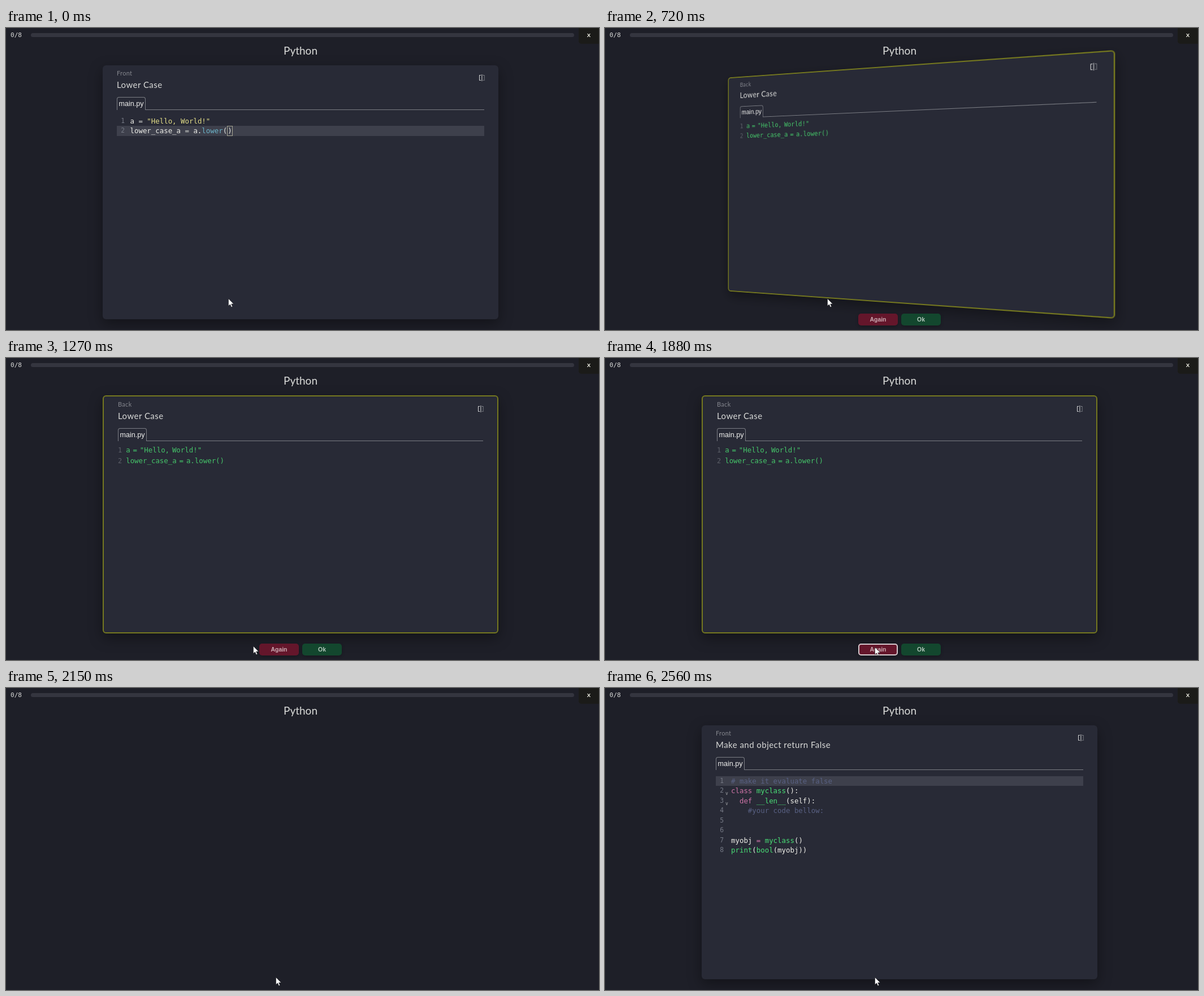
Recreate the animation shown at these times as an HTML page. Size 1049 by 534 pixels, loop 2.89 s.

```html
<!DOCTYPE html>
<html lang="en">
<head>
<meta charset="utf-8">
<title>Flashcards</title>
<style>
  html, body { margin: 0; width: 100%; height: 100%; overflow: hidden; background: #1e1f28; }
  body { position: relative; color: #d9dad8; font-family: Lato, sans-serif; }
  div, svg { position: absolute; box-sizing: border-box; }
  .count { left: 8px; top: 5px; font: 11.1px/16px "DejaVu Sans Mono", monospace; }
  .bar { left: 44px; top: 9px; width: 961px; height: 7px; border-radius: 4px; background: #34353f; }
  .close { left: 1013px; top: 0; width: 36px; height: 28px; border-radius: 0 0 0 5px; background: #1b1b19;
    font: bold 9.6px/26px "Liberation Sans", sans-serif; text-align: center; color: #f0f0e6; }
  .deck { left: 0; top: 28px; width: 1042px; font-size: 19px; line-height: 24px; text-align: center; }
  .clip { left: 0; top: 33px; width: 1049px; height: 501px; overflow: hidden; }
  .slide { left: 171px; top: 33px; width: 700px; height: 449px; }
  .face { left: 0; top: 0; width: 700px; height: 449px; border-radius: 6px; background: #282a36;
    box-shadow: 0 8px 24px rgba(0, 0, 0, .38); }
  .back { height: 421px; border: 2px solid #75781f; }
  .inner { inset: 0; }
  .side { left: 25px; top: 6px; font-size: 11px; line-height: 16px; letter-spacing: .3px; color: #85878e; }
  .name { left: 25px; top: 24px; font-size: 15px; line-height: 20px; letter-spacing: .46px; white-space: nowrap; }
  .rule { left: 75px; right: 25px; top: 78px; height: 1px; background: #7b7d84; }
  .tab { left: 25px; top: 56px; width: 51px; height: 23px; border: 1px solid #7b7d84; border-bottom: 0;
    border-radius: 4px 4px 0 0; font: 12.6px/22px "Liberation Sans", sans-serif; text-align: center; color: #f0f0ee; }
  .split { right: 24px; top: 16px; }
  .code { left: 25px; right: 25px; top: 89.5px; --row: 17.5px; --pad: 23.5px;
    font: 12.4px/17.5px "DejaVu Sans Mono", monospace; white-space: pre; color: #f0f0ea; }
  .wide { --pad: 27px; }
  .row { left: 0; width: 100%; top: calc(var(--i) * var(--row)); height: var(--row); padding-left: var(--pad); }
  .on { background: #3e404c; }
  .no { left: 0; top: 0; width: 14px; text-align: right; font-size: 11.4px; color: #747884; }
  .fold { left: 17px; top: 5px; font-size: 8px; color: #a5a7aa; }
  .back .code { top: 86px; --row: 18.5px; --pad: 14.2px; line-height: 18.5px; word-spacing: -2.6px; color: #45c469; }
  .back .no { text-align: left; font-size: 12px; color: #5c5f68; }
  .s { color: #e4df88; } .f { color: #6cb4ca; } .k { color: #d074a8; }
  .g { color: #49df76; } .c { color: #596184; } .o { color: #c9cac8; }
  .m { outline: 1px solid #a6a593; outline-offset: -1px; padding: 1px 1px 2px; }
  .btn { top: 505px; width: 70px; height: 21px; border-radius: 5px; box-shadow: 0 2px 5px rgba(0, 0, 0, .25);
    font: bold 10.4px/21px "Liberation Sans", sans-serif; text-align: center; }
  .again { left: 448px; background: #64162b; color: #cbabb3; }
  .ok { left: 524px; background: #13472e; color: #b3c6bb; }
  .again.hot::after { content: ""; position: absolute; inset: 0; border: 2px solid #d3c8cc; border-radius: 5px; }
  .mouse { left: 0; top: 0; overflow: visible; }
</style>
</head>
<body>
<div class="count">0/8</div>
<div class="bar"></div>
<div class="close">X</div>
<div class="deck">Python</div>
<div class="clip"><div class="slide"></div></div>
<div class="btn again">Again</div>
<div class="btn ok">Ok</div>
<svg class="mouse" width="12" height="18">
  <path d="M.5 .5V13.6L3.5 10.8 5.6 15.6 7.7 14.7 5.7 10H9.8Z" fill="#fff" stroke="#15151a" stroke-width=".6"/>
</svg>
<script>
const $ = s => document.querySelector(s);
const slide = $('.slide'), again = $('.again'), ok = $('.ok'), mouse = $('.mouse');
const LOOP = 2890, TICK = 68.33, FLIP = 510;

const icon = `<svg class="split" width="11" height="12" fill="none" stroke="#d5d6d6">
  <path d="M4 1.5H1.5V10.5H4M5.9 0V12"/>
  <path d="M8 1.5H10.2V10.5H8" stroke-dasharray="1.5 1" stroke-opacity=".75"/></svg>`;

function addFace(kind, side, name, lines, active, folds = []) {
  const el = document.createElement('div');
  const rows = lines.map((line, i) =>
    `<div class="row${i === active ? ' on' : ''}" style="--i:${i}"><div class="no">${i + 1}</div>` +
    (folds.includes(i) ? '<div class="fold">v</div>' : '') + line + '</div>').join('');
  el.className = 'face ' + kind;
  el.innerHTML = `<div class="inner"><div class="side">${side}</div><div class="name">${name}</div>${icon}
    <div class="rule"></div><div class="tab">main.py</div>
    <div class="code${folds.length ? ' wide' : ''}">${rows}</div></div>`;
  slide.append(el);
  return el;
}
const tag = (cls, text) => `<span class="${cls}">${text}</span>`;

const front = addFace('front', 'Front', 'Lower Case', [
  `a ${tag('o', '=')} ${tag('s', '"Hello, World!"')}`,
  `lower_case_a ${tag('o', '=')} a.${tag('f', 'lower')}(${tag('m', ')')}`
], 1);
const back = addFace('back', 'Back', 'Lower Case', ['a = "Hello, World!"', 'lower_case_a = a.lower()']);
const next = addFace('front', 'Front', 'Make and object return False', [
  tag('c', '# make it evaluate false'),
  `${tag('k', 'class')} ${tag('g', 'myclass')}():`,
  `  ${tag('k', 'def')} ${tag('g', '__len__')}(self):`,
  tag('c', '    #your code bellow:'),
  '', '',
  `myobj ${tag('k', '=')} ${tag('g', 'myclass')}()`,
  `${tag('g', 'print')}(${tag('g', 'bool')}(myobj))`
], 0, [1, 2]);

const path = [[982, 393, 478], [1125, 408, 489], [1262, 437, 509], [1330, 465, 513],
  [1467, 516, 508], [1603, 486, 504], [1672, 477, 511]];

const progress = (t, from, span) => Math.min(1, Math.max(0, (t - from) / span));
const show = (el, on) => { el.style.visibility = on ? 'visible' : 'hidden'; };
const turn = (el, angle) => {
  el.style.transform = angle ? `perspective(800px) rotateY(${angle}deg)` : 'none';
};

function pointer(t) {
  const i = path.findIndex(p => p[0] > t);
  if (i === 0) return path[0].slice(1);
  if (i < 0) return path[path.length - 1].slice(1);
  const [t0, x0, y0] = path[i - 1], [t1, x1, y1] = path[i];
  const u = (t - t0) / (t1 - t0);
  return [x0 + (x1 - x0) * u, y0 + (y1 - y0) * u];
}

function draw(time) {
  // the screen refreshes in coarse ticks
  const t = FLIP + Math.floor((time - FLIP) / TICK + 1e-6) * TICK;
  const flipped = time >= FLIP;
  const angle = 180 * (1 - (1 - progress(t, 548, 235)) ** 2);
  const leave = progress(t, 1877, 270);
  const enter = progress(t, 2260, 295);

  show(front, angle < 90);
  show(back, angle >= 90 && leave < 1);
  show(next, enter > 0);
  front.style.height = flipped ? '421px' : '449px';
  front.firstChild.style.opacity = flipped ? 0 : 1;
  turn(front, angle);
  turn(back, angle - 180);

  const shift = enter > 0 ? 880 * (1 - enter) ** 3 : -880 * leave ** 2;
  slide.style.transform = shift ? `translateX(${shift}px)` : 'none';

  const answering = flipped && leave === 0;
  show(again, answering);
  show(ok, answering);
  again.classList.toggle('hot', answering && t > 1600);

  const [x, y] = pointer(t);
  mouse.style.transform = `translate(${Math.round(x)}px, ${Math.round(y)}px)`;
}

const start = performance.now();
function tick() {
  draw((performance.now() - start) % LOOP);
  requestAnimationFrame(tick);
}
tick();
</script>
</body>
</html>
```
